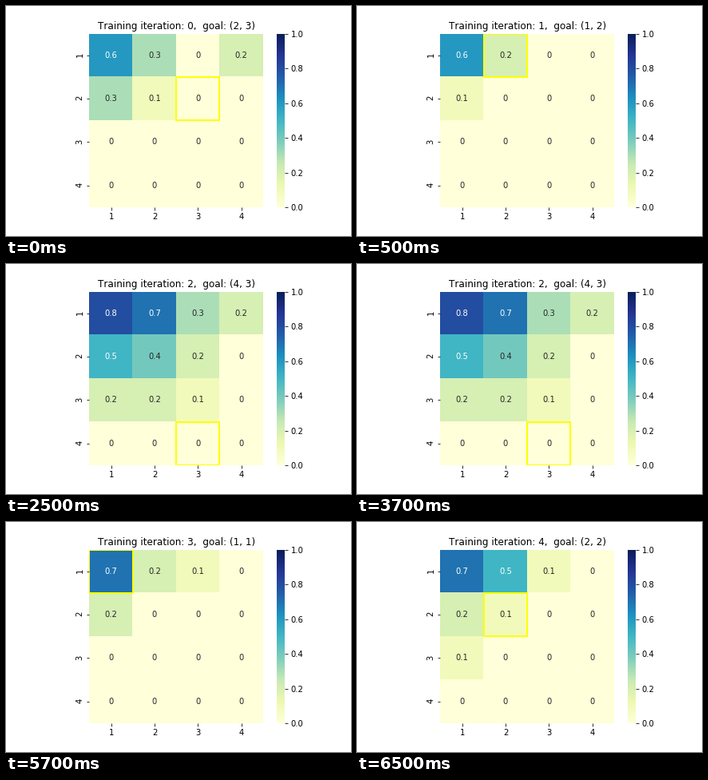
Animation, 432 px wide and 288 px high, one loop 8 s. Source, as a matplotlib script:

```python
import matplotlib.pyplot as plt
import numpy as np
from matplotlib.animation import FuncAnimation
from matplotlib.patches import Rectangle

plt.rcParams.update({"font.family": "DejaVu Sans", "font.size": 10,
                     "text.kerning_factor": 6})

WIDTH, HEIGHT = 432, 288
CELLS, CELL = 4, 54.36
LEFT, TOP = 104.4, 34.56
SIDE = CELLS * CELL

# Leading values of each row and the goal cell (row, column).
STAGES = [
    ([[.6, .3, 0, .2], [.3, .1]], (2, 3)),
    ([[.6, .2], [.1]], (1, 2)),
    ([[.8, .7, .3, .2], [.5, .4, .2], [.2, .2, .1]], (4, 3)),
    ([[.7, .2, .1], [.2]], (1, 1)),
    ([[.7, .5, .1], [.2, .1], [.1]], (2, 2)),
]


def pixel_edges(start):
    """Cell edges rounded down to whole pixels, in cell units."""
    edges = np.floor(start + CELL * np.arange(CELLS + 1))
    edges[-1] += 1  # the axes clip the overhang
    return (edges - start) / CELL


def add_axes(left, width):
    return fig.add_axes([left / WIDTH, 1 - (TOP + SIDE) / HEIGHT,
                         width / WIDTH, SIDE / HEIGHT])


fig = plt.figure(figsize=(WIDTH / 72, HEIGHT / 72), dpi=72, facecolor="white")
ax = add_axes(LEFT, SIDE)
cax = add_axes(338.58, SIDE / 20)

mesh = ax.pcolormesh(pixel_edges(LEFT), pixel_edges(TOP),
                     np.zeros((CELLS, CELLS)), cmap="YlGnBu", vmin=0, vmax=1)
ax.set(xlim=(0, CELLS), ylim=(CELLS, 0))
centers = np.arange(CELLS) + .5
ax.set_xticks(centers, range(1, CELLS + 1))
ax.set_yticks(centers, range(1, CELLS + 1), rotation=90)
ax.spines[:].set_visible(False)
title = ax.set_title("", fontsize=12)
labels = [[ax.text(x, y, "", ha="center", va="center") for x in centers]
          for y in centers]
goal_box = ax.add_patch(Rectangle((0, 0), 1, 1, fill=False,
                                  edgecolor="yellow", lw=2))

bar = fig.colorbar(mesh, cax=cax)
bar.outline.set_visible(False)
bar.set_ticks(np.linspace(0, 1, 6))


def text_color(rgb):
    """White on dark cells, dark grey on light ones, by relative luminance."""
    rgb = np.array(rgb)
    linear = np.where(rgb <= .03928, rgb / 12.92, ((rgb + .055) / 1.055) ** 2.4)
    return ".15" if linear @ [.2126, .7152, .0722] > .408 else "w"


def update(frame):
    # The first stage lasts one tick, the others four.
    stage = (frame + 3) // 4
    rows, goal = STAGES[stage]
    grid = np.zeros((CELLS, CELLS))
    for r, row in enumerate(rows):
        grid[r, :len(row)] = row
    mesh.set_array(grid)
    for (r, c), value in np.ndenumerate(grid):
        labels[r][c].set_text(f"{value:.2g}")
        labels[r][c].set_color(text_color(mesh.cmap(value)[:3]))
    title.set_text(f"Training iteration: {stage},  goal: {goal}")
    goal_box.set_xy((goal[1] - 1, goal[0] - 1))
    return []


anim = FuncAnimation(fig, update, frames=16, interval=500, repeat=True,
                     repeat_delay=0, init_func=lambda: update(0))
plt.show()
```
